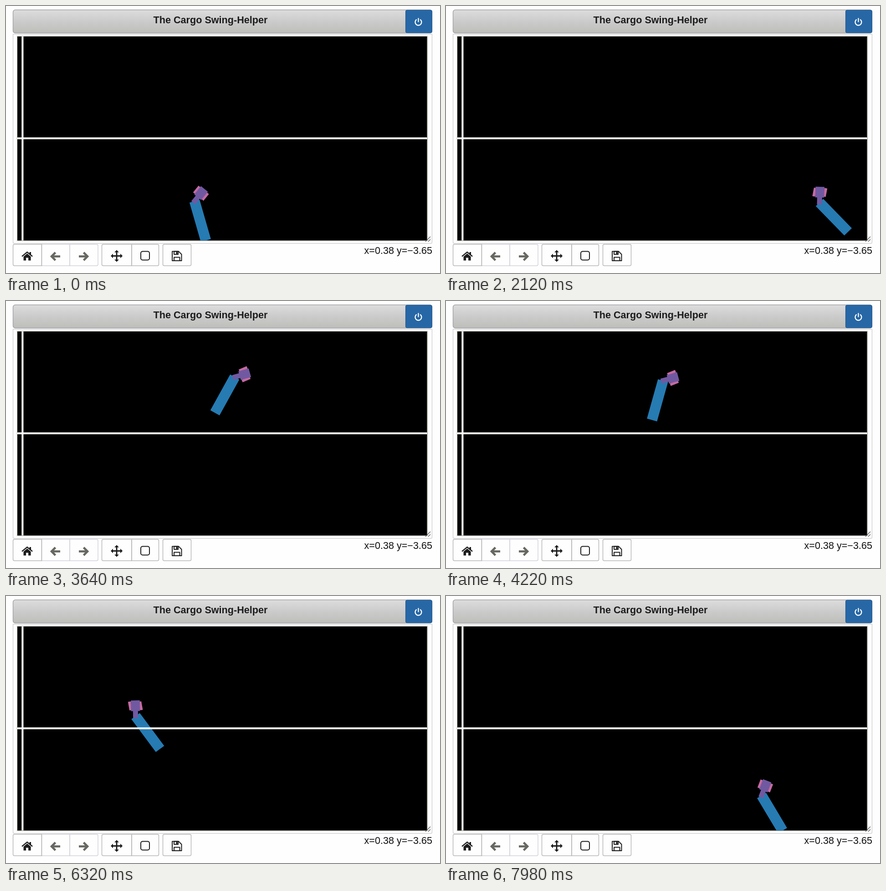
These frames come from a looping animation (953x587 px, 8000 ms). An HTML page with a canvas:

```html
<!DOCTYPE html>
<html lang="en">
<head>
<meta charset="utf-8">
<title>Trailer simulation</title>
<style>
html, body { margin: 0; width: 100%; height: 100%; overflow: hidden; background: #fefefe; }
canvas { display: block; }
</style>
</head>
<body>
<canvas id="stage" width="953" height="587"></canvas>
<script>
const ctx = document.getElementById('stage').getContext('2d');
const LOOP = 8000;
const STEP = 2.25;      // pixels backed up per step
const TRAILER = 90;
const RAD = Math.PI / 180;
const INK = '#1c1c1c';

// Each run passes through the given pose at time `at`; angles in degrees.
const runs = [
  { end: 200,  at: 0,    x: 414,   y: 429,   cab: 51, trailer: 106,   steer: 0 },
  { end: 1700, at: 1380, x: 639,   y: 406.5, cab: 63, trailer: 24,    steer: 5 },
  { end: 3060, at: 2960, x: 819,   y: 468,   cab: 90, trailer: 153,   steer: 0 },
  { end: 4740, at: 4220, x: 476.5, y: 175,   cab: 15, trailer: 74.4,  steer: 7 },
  { end: 5700, at: 5340, x: 372.5, y: 300,   cab: 28, trailer: 108.7, steer: 7 },
  { end: 7000, at: 6320, x: 284.5, y: 264,   cab: 91, trailer: 126.6, steer: 9 },
  { end: 8000, at: 7980, x: 693,   y: 438.5, cab: 69, trailer: 120.8, steer: 0 }
];

// Three quick steps, then a pause, every 160 ms.
function stepAt(t) {
  const cycle = Math.floor((t - 20) / 160);
  const phase = t - 20 - cycle * 160;
  return 3 * cycle + Math.min(2, Math.floor(phase / 20));
}

function poseAt(t) {
  const run = runs.find(r => t < r.end) || runs[runs.length - 1];
  const seed = run.x;
  const steps = stepAt(t) - stepAt(run.at);
  const dir = Math.sign(steps);
  const wobble = i => 2.5 * (Math.sin(i * 1.7 + seed) - Math.sin(seed));
  let { x, y, cab } = run;
  let trailer = run.trailer * RAD;
  let heading = cab * RAD;
  for (let i = 1; i <= Math.abs(steps); i++) {
    x -= dir * STEP * Math.cos(heading);
    y += dir * STEP * Math.sin(heading);
    trailer -= dir * STEP / TRAILER * Math.sin(heading - trailer);
    heading = (cab + wobble(i * dir)) * RAD;
  }
  const steer = (run.steer + 2 * wobble(steps * 1.3)) * RAD;
  return { x, y, heading, trailer, steer };
}

function box(x, y, w, h, color) {
  ctx.fillStyle = color;
  ctx.fillRect(x, y, w, h);
}

function panel(x, y, w, h, radii, fill, stroke, width = 1.5) {
  ctx.beginPath();
  ctx.roundRect(x, y, w, h, radii);
  if (fill) { ctx.fillStyle = fill; ctx.fill(); }
  if (stroke) { ctx.strokeStyle = stroke; ctx.lineWidth = width; ctx.stroke(); }
}

function poly(points, color) {
  ctx.beginPath();
  points.forEach(([x, y]) => ctx.lineTo(x, y));
  ctx.closePath();
  ctx.fillStyle = color;
  ctx.fill();
}

function line(points, color, width, cap = 'butt') {
  ctx.beginPath();
  points.forEach(([x, y]) => ctx.lineTo(x, y));
  ctx.strokeStyle = color;
  ctx.lineWidth = width;
  ctx.lineCap = cap;
  ctx.lineJoin = 'miter';
  ctx.stroke();
}

function at(x, y, angle, draw) {
  ctx.save();
  ctx.translate(x, y);
  ctx.rotate(angle);
  draw();
  ctx.restore();
}

function label(text, x, y, align, weight, color) {
  ctx.font = `${weight} 21.6px "Liberation Sans", Arial, sans-serif`;
  ctx.textAlign = align;
  ctx.fillStyle = color;
  ctx.fillText(text, x, y);
}

function drawHeader() {
  const shade = ctx.createLinearGradient(0, 8, 0, 60);
  shade.addColorStop(0, '#dddddd');
  shade.addColorStop(0.5, '#cbcbcb');
  shade.addColorStop(1, '#bdbdb9');
  panel(15.5, 8.5, 920, 51, 5, shade, '#a3a3a8');
  label('The Cargo Swing-Helper', 449, 38, 'center', 'bold', INK);

  panel(877.5, 9, 58, 50, 3, '#2767a6', '#235a91', 1);
  ctx.beginPath();
  ctx.arc(905.5, 35.5, 7, -50 * RAD, 230 * RAD);
  ctx.strokeStyle = '#fff';
  ctx.lineWidth = 2.3;
  ctx.lineCap = 'round';
  ctx.stroke();
  line([[905.5, 27.5], [905.5, 34.5]], '#fff', 2.3, 'round');
}

function drawArrow(x, y, side) {
  at(x, y, side < 0 ? 0 : Math.PI, () => {
    line([[0.5, -8.5], [-8, 0], [0.5, 8.5]], '#686862', 4.6);
    line([[-7, 0], [11, 0]], '#686862', 4.6);
  });
}

function drawHouse() {
  line([[35, 550.5], [46.5, 541], [58, 550.5]], INK, 2.4);
  box(51.5, 541, 3.5, 6, INK);
  poly([[38.5, 551], [46.5, 544.3], [54.5, 551], [54.5, 559.5],
    [49, 559.5], [49, 553.5], [44, 553.5], [44, 559.5], [38.5, 559.5]], INK);
}

function drawMove() {
  for (let i = 0; i < 4; i++) {
    at(243, 549.5, i * Math.PI / 2, () => {
      box(0, -1.5, 9, 3, INK);
      poly([[13, 0], [8, -5], [8, 5]], INK);
    });
  }
}

function drawDisk() {
  ctx.beginPath();
  [[365, 539.5], [379, 539.5], [385.5, 546], [385.5, 560], [365, 560]]
    .forEach(([x, y]) => ctx.lineTo(x, y));
  ctx.closePath();
  ctx.strokeStyle = INK;
  ctx.lineWidth = 2;
  ctx.lineJoin = 'round';
  ctx.stroke();
  ctx.strokeRect(369, 552.5, 12.5, 7.5);
  ctx.strokeRect(369, 539.5, 9, 6.5);
  box(373.5, 540, 3, 5.5, INK);
}

function drawToolbar() {
  const top = 524, h = 47, edge = '#b9b9b9', faint = '#d5d2dc';
  panel(78, top, 62, h, 0, null, faint);
  panel(140, top, 62, h, [0, 3, 3, 0], null, faint);
  panel(15.5, top, 63, h, [3, 0, 0, 3], null, edge);
  panel(210.5, top, 65.5, h, [3, 0, 0, 3], null, edge);
  panel(276, top, 59.5, h, [0, 3, 3, 0], null, edge);
  panel(344.5, top, 62, h, 3, null, edge);

  drawHouse();
  drawArrow(108, 550.5, -1);
  drawArrow(171, 550.5, 1);
  drawMove();
  panel(296, 539.5, 19, 19, 4, null, INK, 2);
  drawDisk();
  label('x=0.38 y=\u22123.65', 936, 545, 'right', 'normal', '#111');
}

function drawTruck({ x, y, heading, trailer, steer }) {
  at(x, y, -trailer, () => box(-TRAILER, -11.5, TRAILER, 23, '#267bb2'));
  at(x, y, -heading, () => {
    for (const side of [-1, 1]) {
      at(22.5, side * 11.7, -steer, () => box(-9.5, -3, 19, 6, '#c56aa2'));
    }
    box(-4.5, -5.5, 17, 11, '#7159a1');
    box(11, -9.8, 23.5, 19.6, '#7159a1');
  });
}

function drawPlot(t) {
  panel(15.5, 62, 920, 460, [0, 0, 3, 3], null, '#d2d2d2');
  box(23.5, 65.5, 903, 451.5, '#cfcfc8');
  box(25, 67, 899.5, 448.5, '#000');
  ctx.save();
  ctx.beginPath();
  ctx.rect(25, 67, 899.5, 448.5);
  ctx.clip();
  drawTruck(poseAt(t));
  box(34.2, 67, 4.2, 449, '#fbfbf6');
  box(25, 288.8, 900, 4.2, '#fbfbf6');
  ctx.restore();
  line([[921, 518], [932, 507]], '#555', 1.3);
  line([[927, 518], [932, 513]], '#555', 1.3);
}

function render(t) {
  box(0, 0, 953, 587, '#fefefe');
  drawHeader();
  drawPlot(t);
  drawToolbar();
}

const start = performance.now();
function frame() {
  render((performance.now() - start) % LOOP);
  requestAnimationFrame(frame);
}
frame();
</script>
</body>
</html>
```
